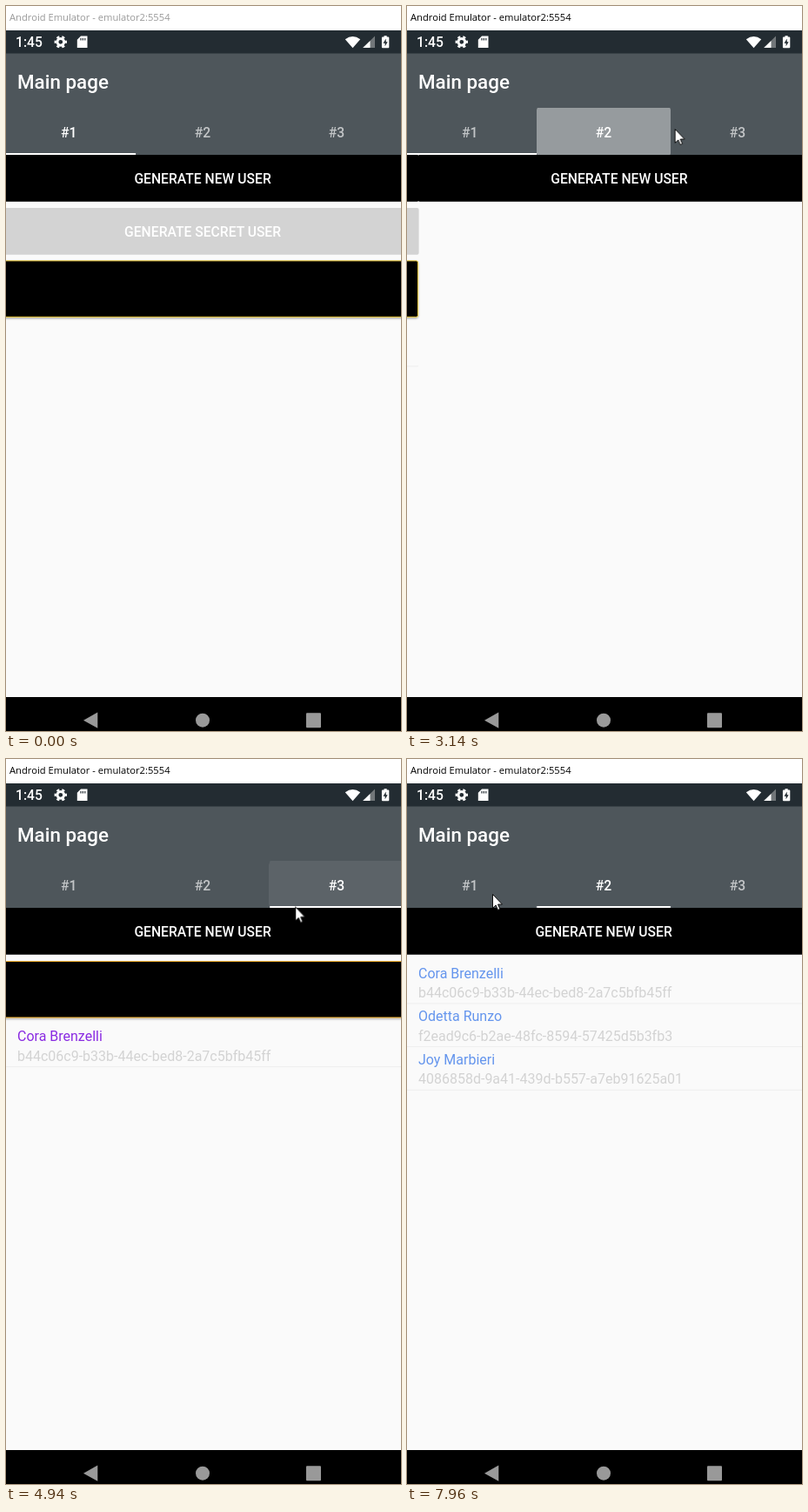
Animation of 454x833 px, one loop 8 s. Source, as an HTML page:

```html
<!DOCTYPE html>
<html lang="en">
<head>
<meta charset="utf-8">
<title>Main page</title>
<style>
  html, body { margin: 0; width: 100%; height: 100%; overflow: hidden; background: #fafafa; }
  svg { display: block; width: 454px; height: 833px; }
  text { font: 400 16px Roboto, sans-serif; fill: #fff; }
  .caps { font-weight: 500; font-size: 15.7px; text-anchor: middle; }
  .uuid { fill: #d3d3d3; }
  #heading { font-weight: 500; font-size: 22.4px; }
  #clock { font-weight: 500; font-size: 15.7px; }
  #caption { font: 400 11.2px "Open Sans", sans-serif; fill: #999; }
</style>
</head>
<body>
<svg viewBox="0 0 454 833">
  <defs>
    <filter id="shadow" x="-5%" y="-20%" width="110%" height="150%">
      <feDropShadow dx="0" dy="1.2" stdDeviation="1" flood-color="#000" flood-opacity=".35"/>
    </filter>
  </defs>
  <rect width="454" height="833" fill="#fafafa"/>
  <g id="pages"></g>

  <rect width="454" height="28" fill="#fff"/>
  <text id="caption" x="4" y="17">Android Emulator - emulator2:5554</text>

  <rect y="28" width="454" height="27" fill="#232c32"/>
  <rect y="54.5" width="454" height="116.5" fill="#4e565b"/>
  <text id="clock" x="11" y="47">1:45</text>
  <g fill="#fff">
    <circle cx="62.8" cy="41.3" r="3.9" fill="none" stroke="#fff" stroke-width="3"/>
    <circle cx="62.8" cy="41.3" r="6.1" fill="none" stroke="#fff" stroke-width="2.2"
      pathLength="12" stroke-dasharray="1" stroke-dashoffset=".5"/>
    <path d="M86 34.5H93.5V48H81.8V38.7Z"/>
    <path d="M86 37V39.6M88.4 37V39.6M90.8 37V39.6" stroke="#232c32" stroke-width="1.2"/>
    <path d="M389.8 38.3Q398.5 31.5 407.2 38.3L398.5 48.3Z"/>
    <path d="M424 34.5V48H410.2Z" fill="#717679"/>
    <path d="M418.5 39.9V48H410.2Z"/>
    <rect x="434.5" y="34.2" width="3.2" height="2"/>
    <rect x="431.9" y="35.5" width="8.4" height="12.7" rx="1"/>
    <path d="M436.7 37.5L433.5 42.8H435.6V46.3L438.7 41.2H436.7Z" fill="#232c32"/>
  </g>
  <text id="heading" x="13" y="95">Main page</text>
  <g id="tabs"></g>
  <rect id="bar" x="-4.7" y="169" width="153.8" height="2" fill="#fff"/>

  <rect y="794" width="454" height="39" fill="#000"/>
  <g fill="#999">
    <path d="M89 820.7L105.3 811.6V829.8Z"/>
    <circle cx="226" cy="820.7" r="8"/>
    <rect x="345" y="812.2" width="17" height="17" rx="1"/>
  </g>
  <path id="cursor" d="M.5 .5V16.3L4.1 12.9L6.5 18.4L8.8 17.4L6.5 12H11.4Z" fill="#fff" stroke="#000" stroke-width=".9"/>
</svg>
<script>
const LOOP = 8000, LEFT = -4.7, WIDTH = 461.5, TAB = WIDTH / 3, ROW = 49.7;
const HOLD = 'steps(1, end)';
const SETTLE = 'cubic-bezier(.22, 1, .36, 1)';
const SMOOTH = 'cubic-bezier(.4, 0, .2, 1)';
const FADE_IN = 'cubic-bezier(.5, 0, .5, 1)';
const $ = id => document.getElementById(id);

const users = [
  { name: 'Cora Brenzelli', id: 'b44c06c9-b33b-44ec-bed8-2a7c5bfb45ff', at: 2250 },
  { name: 'Odetta Runzo', id: 'f2ead9c6-b2ae-48fc-8594-57425d5b3fb3', at: 5780 },
  { name: 'Joy Marbieri', id: '4086858d-9a41-439d-b557-a7eb91625a01', at: 6140 }
];

// ready: when a page first fills its list
const pages = [
  { color: '#6495ed', border: '#f0d040', secret: true, ready: 0 },
  { color: '#6495ed', ready: 3300 },
  { color: '#8a2be2', border: '#f0b030', ready: 0 }
];

const taps = [
  { from: 0, to: 1, press: 2710, slide: 3041, bar: 3140 },
  { from: 1, to: 2, press: 4475, slide: 4503, bar: 4503 },
  { from: 2, to: 1, press: 7400, slide: 7439, bar: 7439 }
];

// Pointer moves: start, end, x, y reached
const strokes = [
  [260, 640, 237, 179],
  [1700, 1740, 234, 196],
  [1790, 1970, 220, 142],
  [2740, 3500, 386, 140],
  [3550, 3960, 396, 138],
  [4110, 4290, 382, 146],
  [4620, 5400, 261, 203],
  [6520, 6930, 236, 150],
  [7360, 7960, 98, 155]
];

function add(parent, tag, attrs, text) {
  const el = document.createElementNS('http://www.w3.org/2000/svg', tag);
  for (const k in attrs) el.setAttribute(k, attrs[k]);
  if (text) el.textContent = text;
  return parent.appendChild(el);
}

// steps: [ms, style, easing to the next step]
function play(el, steps) {
  const list = [...steps];
  if (list[0][0] > 0) list.unshift([0, list[0][1], HOLD]);
  const last = list[list.length - 1];
  if (last[0] < LOOP) list.push([LOOP, last[1]]);
  const frames = list.map(([ms, style, easing = 'linear']) =>
    ({ ...style, offset: ms / LOOP, easing }));
  el.animate(frames, { duration: LOOP, iterations: Infinity });
}

const shift = (x, y = 0) => ({ transform: `translate(${x}px, ${y}px)` });
const fade = opacity => ({ opacity });

function button(parent, y, fill, label) {
  add(parent, 'rect', { x: -.5, y, width: WIDTH + 1, height: 53.8, rx: 2, fill });
  add(parent, 'text', { class: 'caps', x: WIDTH / 2, y: y + 33 }, label);
}

function panel(parent, y, stroke) {
  add(parent, 'rect', {
    x: .5, y: y + .5, width: WIDTH - 1, height: 64.5, rx: 2,
    fill: '#000', stroke, filter: 'url(#shadow)'
  });
}

function userRow(parent, y, user, page) {
  const row = add(parent, 'g');
  add(row, 'text', { x: 17.7, y: y + 19.5, style: `fill:${page.color}` }, user.name);
  add(row, 'text', { class: 'uuid', x: 17.7, y: y + 42 }, user.id);
  add(row, 'rect', { y: y + 48.4, width: WIDTH, height: 1, fill: '#eee' });
  play(row, [[0, fade(0), HOLD], [Math.max(user.at, page.ready), fade(1)]]);
}

pages.forEach((page, i) => {
  const g = add($('pages'), 'g', { transform: `translate(${LEFT + i * WIDTH} 0)` });
  let y = 171;
  button(g, y, '#000', 'GENERATE NEW USER');
  y += 61;
  if (page.secret) {
    button(g, y, '#d3d3d3', 'GENERATE SECRET USER');
    y += 60.3;
  }
  if (page.border) {
    panel(g, y, page.border);
    y += 72.7;
  }
  users.forEach((user, n) => userRow(g, y + n * ROW, user, page));
});

play($('pages'), taps.flatMap(({ from, to, slide }) => [
  [slide, shift(-from * WIDTH), SETTLE], [slide + 200, shift(-to * WIDTH), HOLD]
]));
play($('bar'), taps.flatMap(({ from, to, bar }) => [
  [bar, shift(from * TAB), SMOOTH], [bar + 300, shift(to * TAB), HOLD]
]));

// Touch ripples grow from the pointer towards the tab's centre
taps.forEach(({ to, press, slide }, i) => {
  const x = LEFT + to * TAB;
  const clip = add($('tabs'), 'clipPath', { id: 'clip' + i });
  add(clip, 'rect', { x, y: 117.3, width: TAB, height: 53.7 });
  const g = add($('tabs'), 'g', { 'clip-path': `url(#clip${i})` });
  const dot = add(g, 'circle', { cx: x + TAB / 2, cy: 144.2, fill: '#fff' });
  const full = press + 125;
  play(dot, [
    [press, { r: '30px', ...shift(12, 6) }],
    [full, { r: '81px', ...shift(0) }]
  ]);
  play(g, [
    [press, fade(0), FADE_IN], [full, fade(.41)],
    [slide + 200, fade(.41)], [slide + 500, fade(0)]
  ]);
});

pages.forEach((_, i) => {
  const label = add($('tabs'), 'text',
    { class: 'caps', x: LEFT + TAB * (i + .5), y: 150.5 }, '#' + (i + 1));
  const lit = tab => fade(tab === i ? 1 : .66);
  play(label, [[0, lit(0), HOLD], ...taps.map(({ to, slide }) => [slide, lit(to), HOLD])]);
});

play($('caption'), [[0, { fill: '#999' }, HOLD], [820, { fill: '#000' }]]);

let tip = shift(361, 708);
const trail = [[0, shift(-40, -40), HOLD]];
for (const [start, end, x, y] of strokes) {
  trail.push([start, tip]);
  tip = shift(x, y);
  trail.push([end, tip, HOLD]);
}
play($('cursor'), trail);
</script>
</body>
</html>
```
